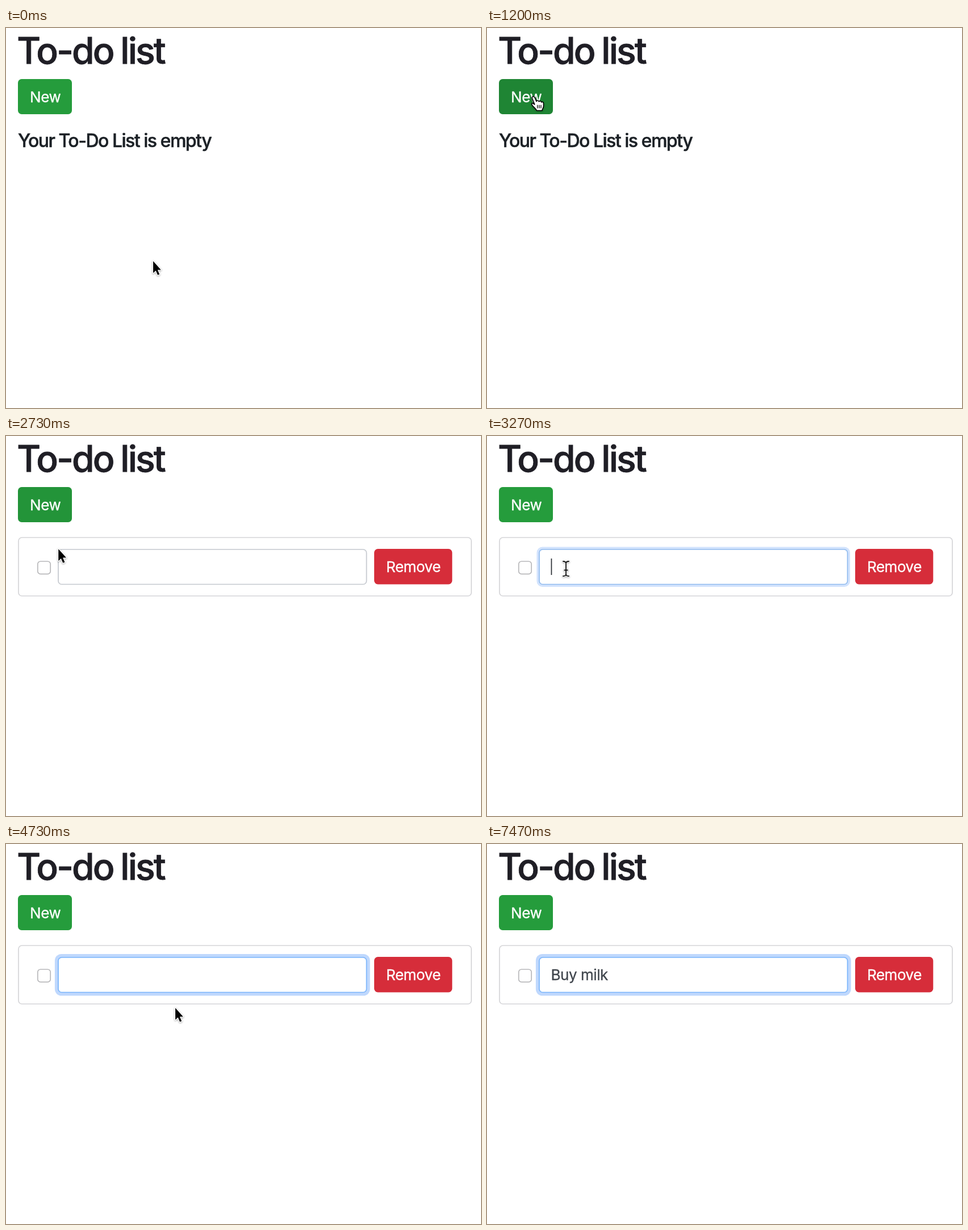
Recreate the animation shown at these times as an HTML page. Size 836x670 px, loop 8000 ms.

```html
<!DOCTYPE html>
<html lang="en">
<head>
<meta charset="utf-8">
<title>To-do list</title>
<style>
  html, body { margin: 0; width: 100%; height: 100%; overflow: hidden; background: #fff; }
  svg { display: block; width: 836px; height: 670px; }
  text { font: 400 26px Inter, "Open Sans", sans-serif; font-optical-sizing: none; letter-spacing: -.45px; white-space: pre; }
  .title { font-size: 64px; font-weight: 500; letter-spacing: -2.8px; word-spacing: -1.5px; fill: #1f1e25; stroke: #1f1e25; stroke-width: .9; }
  .heading { font-size: 32px; font-weight: 500; letter-spacing: -1.5px; fill: #1c2126; stroke: #1c2126; stroke-width: .5; }
  .label { fill: #fff; stroke: #fff; stroke-width: .35; }
  .typed { fill: #40464d; stroke: #40464d; stroke-width: .3; }
  .outline { fill: #fff; stroke-width: 1.7; }
  .pointer { filter: drop-shadow(0 1.5px 1.5px rgba(0, 0, 0, .35)); stroke-linejoin: round; }
</style>
</head>
<body>
<svg viewBox="0 0 836 670">
  <text class="title" x="19.3" y="63">To-do list</text>
  <rect id="newButton" x="21" y="90" width="95" height="62" rx="6.5"/>
  <text class="label" x="42" y="131">New</text>

  <text id="emptyNote" class="heading" x="21" y="210">Your To-Do List is empty</text>

  <g id="item">
    <rect class="outline" x="22" y="179" width="797" height="103" rx="6" stroke="#d5d5d8"/>
    <rect class="outline" x="55.8" y="221" width="22.4" height="22.4" rx="5" stroke="#b8b8ba"/>
    <rect id="halo" fill="#bfd8fd"/>
    <rect id="field" class="outline" x="92" y="200" width="542.5" height="61.5" rx="6"/>
    <text id="typed" class="typed" x="112.5" y="240"></text>
    <rect id="caret" y="216" width="1.7" height="29" fill="#2a2e33"/>
    <rect x="648" y="199" width="137.3" height="62.5" rx="6.5" fill="#d62d3a"/>
    <text class="label" x="669" y="240">Remove</text>
  </g>

  <g id="pointer" class="pointer">
    <path id="arrow" d="M1 2V23L5.6 18.8L9 26.6L12.2 25.2L8.8 17.4H14.8Z"
          stroke="#fff" stroke-width="2.6" paint-order="stroke"/>
    <g id="hand" transform="translate(-4 -2)" fill="#fff" stroke="#000" stroke-width="1.6" stroke-linecap="round">
      <path d="M2 4.5C1 1 5 .2 6.5 3L9.5 10C10 8 13.2 8 14 10.3C15 8.6 17.6 9 18.2 11.4C19.5 10 22 11 22 13.5V18C22 21 20 22.5 19.5 26H10C9 23 5 20.5 2.5 17.2C0 14 1.5 12.3 3.8 13.5L6.3 15.3Z"/>
      <path d="M11.3 16.5V21.5M14.4 16.5V21.5M17.5 16.5V21.5" stroke-width="1.3"/>
    </g>
    <g id="beam" fill="none" stroke-linecap="round">
      <defs>
        <path id="beamShape" d="M-5 -13Q0 -13 0 -9.5Q0 -13 5 -13M0 -10V10M-5 13Q0 13 0 9.5Q0 13 5 13M-2.8 2.5H2.8"/>
      </defs>
      <use href="#beamShape" stroke="#fff" stroke-width="3.6"/>
      <use href="#beamShape" stroke="#111" stroke-width="1.8"/>
    </g>
  </g>
</svg>
<script>
const LOOP = 8000, BLINK = 530, FADE = 150;
const ADDED = 1470, FOCUSED = 3175;
const CARET_PHASE = 3140;
const TASK = 'Buy milk';
const KEY_TIMES = [5330, 5400, 5470, 5530, 5670, 5730, 5800, 5875];
const LAST_KEY = KEY_TIMES[KEY_TIMES.length - 1];

const smooth = u => u * u * (3 - 2 * u);
const easeIn = u => u ** 1.5;
const cubicIn = u => u ** 3;
const easeOut = u => 1 - (1 - u) ** 2;

// Pointer stops: time, x, y, easing used to get there
const STOPS = [
  [70, 258, 409],
  [730, 111, 274, easeIn],
  [1270, 81, 119, easeOut],
  [2250, 81, 119, smooth],
  [2730, 91, 197, cubicIn],
  [3110, 139, 234, easeOut],
  [4000, 139, 234, smooth],
  [4200, 297, 287, smooth],
];

const $ = id => document.getElementById(id);
const show = (id, on) => $(id).style.display = on ? '' : 'none';
const set = (id, attrs) => {
  for (const name in attrs) $(id).setAttribute(name, attrs[name]);
};
const lerp = (a, b, u) => a + (b - a) * u;
const mix = (a, b, u) => `rgb(${a.map((v, i) => Math.round(lerp(v, b[i], u)))})`;
const fade = (t, start) => smooth(Math.min(1, Math.max(0, (t - start) / FADE)));

function pointerAt(t) {
  const next = STOPS.findIndex(stop => stop[0] > t);
  if (next === 0) return STOPS[0].slice(1, 3);
  if (next < 0) return STOPS[STOPS.length - 1].slice(1, 3);
  const [t0, x0, y0] = STOPS[next - 1], [t1, x1, y1, ease] = STOPS[next];
  const u = ease((t - t0) / (t1 - t0));
  return [lerp(x0, x1, u), lerp(y0, y1, u)];
}

function hoverAt(t) {
  if (t < ADDED) return fade(t, 1020);
  return fade(t, 2250) - fade(t, 2640);
}

function caretOn(t) {
  if (t < FOCUSED) return false;
  if (t >= KEY_TIMES[0] && t < LAST_KEY) return true;
  const start = t < LAST_KEY ? CARET_PHASE : LAST_KEY;
  return Math.floor((t - start) / BLINK) % 2 === 0;
}

function drawPointer(t) {
  const [x, y] = pointerAt(t);
  const overButton = x > 21 && x < 116 && y > 90 && y < 152;
  const overField = t > ADDED && x > 92 && x < 635 && y > 200 && y < 261;
  set('pointer', { transform: `translate(${x} ${y})` });
  show('pointer', t < KEY_TIMES[0]);
  show('hand', overButton);
  show('beam', overField);
  show('arrow', !overButton && !overField);
}

function draw(t) {
  set('newButton', { fill: mix([37, 156, 60], [31, 133, 52], hoverAt(t)) });
  show('emptyNote', t < ADDED);
  show('item', t >= ADDED);

  const focus = fade(t, FOCUSED), spread = 5.3 * focus;
  set('field', { stroke: mix([196, 200, 206], [122, 181, 251], focus) });
  set('halo', {
    x: 91.2 - spread, y: 199.2 - spread, rx: 6.5 + spread,
    width: 544.1 + 2 * spread, height: 63.1 + 2 * spread, opacity: focus,
  });

  const text = TASK.slice(0, KEY_TIMES.filter(k => k <= t).length);
  $('typed').textContent = text;
  const textWidth = text ? $('typed').getComputedTextLength() : 0;
  set('caret', { x: 112.6 + textWidth });
  show('caret', caretOn(t));

  drawPointer(t);
}

const began = performance.now();
function tick() {
  draw((performance.now() - began) % LOOP);
  requestAnimationFrame(tick);
}
tick();
</script>
</body>
</html>
```
